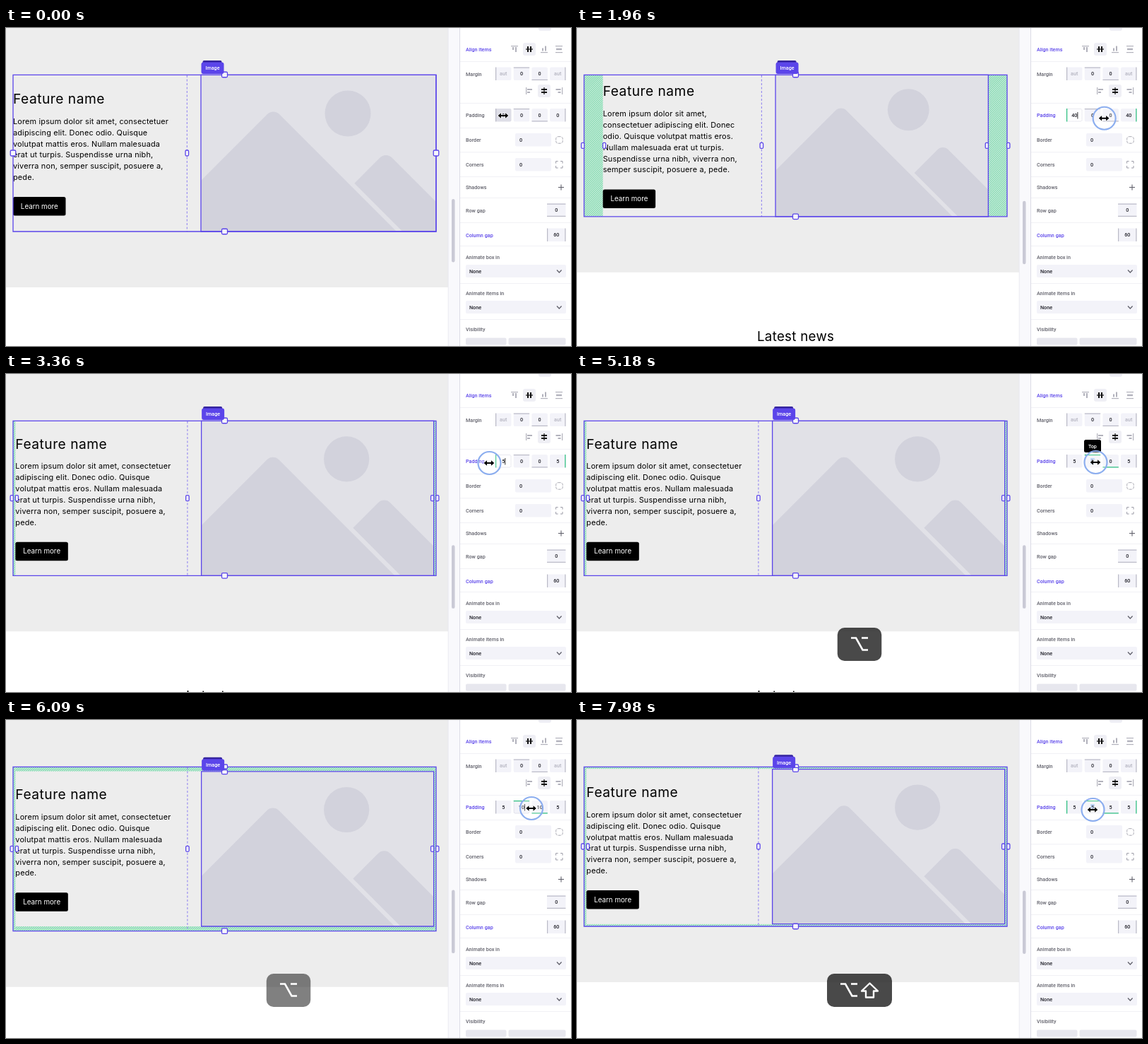
Write an HTML page with a canvas that moves like this. It is 800 px wide and 450 px high and loops after 8000 ms.

```html
<!DOCTYPE html>
<html lang="en">
<head>
<meta charset="utf-8">
<title>Padding controls</title>
<style>
html, body { margin: 0; width: 100%; height: 100%; overflow: hidden; background: #fff; }
canvas { display: block; }
</style>
</head>
<body>
<canvas id="stage" width="800" height="450"></canvas>
<script>
const c = document.getElementById('stage').getContext('2d');
const LOOP = 8000, PURPLE = '#5b45ea', GREEN = '#25bd7b', INK = '#62626c', LINE = '#b9b9c6', FIELD = '#f3f3f9';
const UNIT = 2 / 3; // stage pixels per padding unit

// Linear keyframes: [time, value, value...]
const cursorKeys = [[0, 704, 124], [630, 704, 124], [980, 716, 124], [1330, 716, 124], [1540, 726, 125],
  [2000, 748, 128], [2520, 732, 129], [3080, 694, 126], [3220, 694, 126], [3360, 684, 126], [3500, 680, 126],
  [3640, 680, 126], [4200, 708, 124], [4690, 708, 124], [5100, 734, 125], [5460, 734, 125], [6090, 743.5, 125],
  [6500, 756, 126], [7140, 737, 127], [7560, 730, 127]];
const sideKeys = [[630, 0], [980, 10], [1330, 10], [1540, 15], [2000, 40], [2520, 30], [3080, 10], [3220, 10], [3360, 5]];
const topKeys = [[5460, 0], [6090, 10], [6500, 20], [7140, 5]];

const copy = [
  'Lorem ipsum dolor sit amet, consectetuer|adipiscing elit. Donec odio. Quisque|volutpat mattis eros. Nullam malesuada|erat ut turpis. Suspendisse urna nibh,|viverra non, semper suscipit, posuere a,|pede.',
  'Lorem ipsum dolor sit amet,|consectetuer adipiscing elit. Donec odio.|Quisque volutpat mattis eros. Nullam|malesuada erat ut turpis. Suspendisse|urna nibh, viverra non, semper suscipit,|posuere a, pede.',
  'Lorem ipsum dolor sit amet,|consectetuer adipiscing elit. Donec|odio. Quisque volutpat mattis eros.|Nullam malesuada erat ut turpis.|Suspendisse urna nibh, viverra non,|semper suscipit, posuere a, pede.'
].map(s => s.split('|'));

const clamp = v => Math.max(0, Math.min(1, v));
const snap = v => Math.round(v / 5) * 5;

function at(keys, t) {
  const i = keys.findIndex(k => k[0] > t);
  if (i === 0) return keys[0].slice(1);
  if (i < 0) return keys[keys.length - 1].slice(1);
  const a = keys[i - 1], b = keys[i], p = (t - a[0]) / (b[0] - a[0]);
  return a.slice(1).map((v, j) => v + (b[j + 1] - v) * p);
}

// Opacity of something visible between two times
const shown = (t, from, to, fadeIn, fadeOut) => clamp((t - from) / fadeIn) * clamp(1 - (t - to) / fadeOut);

function box(x, y, w, h, fill, r = 0, stroke, lw = 1) {
  c.beginPath();
  c.roundRect(x, y, w, h, r);
  if (fill) { c.fillStyle = fill; c.fill(); }
  if (stroke) { c.strokeStyle = stroke; c.lineWidth = lw; c.stroke(); }
}

function path(points, color, lw, close) {
  c.beginPath();
  points.forEach(([x, y]) => c.lineTo(x, y));
  if (close) c.closePath();
  c.strokeStyle = color;
  c.lineWidth = lw;
  c.stroke();
}

function text(s, x, y, font, color, align = 'left', spacing = 0) {
  c.font = font;
  c.letterSpacing = spacing + 'px';
  c.fillStyle = color;
  c.textAlign = align;
  c.fillText(s, x, y);
}

const inter = (s, x, y, size, spacing = 0, color = '#000', align) =>
  text(s, x, y, `${size}px Inter, sans-serif`, color, align, spacing);
const ui = (s, x, y, color = INK, align) =>
  text(s, x, y + 2.6, '500 7.2px Roboto, sans-serif', color, align);

function hatch(x, y, w, h) {
  if (w <= 0 || h <= 0) return;
  c.save();
  c.beginPath();
  c.rect(x, y, w, h);
  c.clip();
  c.fillStyle = '#d6f0e3';
  c.fillRect(x, y, w, h);
  c.beginPath();
  for (let d = 0; d < w + h; d += 3) {
    c.moveTo(x + d, y);
    c.lineTo(x + d - h, y + h);
  }
  c.strokeStyle = '#7ad6ab';
  c.lineWidth = 1.1;
  c.stroke();
  c.restore();
}

function handle(x, y, w, h) {
  box(x - w / 2, y - h / 2, w, h, '#f6f6fa', 1.5, PURPLE, 1.3);
}

function placeholder(x, y, w, h) {
  c.save();
  c.beginPath();
  c.rect(x, y, w, h);
  c.clip();
  c.fillStyle = '#e1e1e7';
  c.fillRect(x, y, w, h);
  c.translate(x, y);
  c.scale(w / 333, w / 333);
  c.fillStyle = '#d2d2dc';
  c.beginPath();
  c.arc(208, 55, 32.5, 0, 7);
  c.fill();
  c.beginPath();
  c.moveTo(0, 150);
  c.arcTo(102.5, 47.5, 277, 222, 12);
  c.lineTo(277, 222);
  c.lineTo(0, 222);
  c.fill();
  c.beginPath();
  c.moveTo(217.3, 153.7);
  c.arcTo(262, 109, 333, 180, 12);
  c.lineTo(333, 180);
  c.lineTo(333, 222);
  c.lineTo(285.5, 222);
  c.fill();
  c.restore();
}

function page(side, top) {
  const q = side * UNIT, v = top * UNIT;
  const w = 333 - 1.19 * q, h = w * UNIT, x = 609 - q - w, y = 66 + v;
  const bottom = y + h + v, mid = y + h / 2, left = 10 + q;

  box(0, 0, 626, bottom + 79, '#ededed');
  inter('Latest news', 255, bottom + 176.5, 18.7, 0.3);

  hatch(10, 66, q, bottom - 66);
  hatch(609 - q, 66, q, bottom - 66);
  hatch(left, 66, 599 - 2 * q, v);
  hatch(left, bottom - v, 599 - 2 * q, v);

  placeholder(x, y, w, h);
  inter('Feature name', left, mid - 70, 19.2, 0.5);
  copy[side < 10 ? 0 : side < 22 ? 1 : 2].forEach((s, i) =>
    inter(s, left, mid - 41.2 + i * 15.85, 10.9, 0.16));
  box(left, mid + 62, 74.5, 26.5, '#000', 2.5);
  inter('Learn more', left + 37.3, mid + 78.5, 9.8, 0, '#fff', 'center');

  c.setLineDash([3, 2.5]);
  path([[x - 19.7, 67], [x - 19.7, bottom]], '#8b7df0', 1);
  c.setLineDash([]);
  box(10, 66.3, 599, bottom - 66.3, null, 0, PURPLE, 1.3);
  box(x, y + 0.3, w, h - 0.3, null, 0, PURPLE, 1.3);

  handle(x - 19.7, mid, 4.5, 8);
  if (side) [8.2, left + 2, 607 - q, 610.8].forEach(hx => handle(hx, mid, 4.2, 8));
  else [10, 609].forEach(hx => handle(hx, mid, 7.5, 8));
  handle(309.5, 66, 8, top ? 6 : 7.5);
  if (top) handle(309.5, y + 1, 8, 6);
  handle(309.5, bottom, 8, 7.5);

  box(x + 2.5, y - 20, 27, 6, '#35249f', 2);
  box(x + 0.5, y - 17.5, 32, 16.5, PURPLE, 3);
  ui('Image', x + 16.5, y - 9.3, '#fff', 'center');

  box(626, 0, 16.5, 450, '#f9f9fc');
  box(625.7, 0, 0.8, 450, '#e6e6ee');
  box(631, 242 + (288 - bottom) * 0.13, 4.5, 89.5, '#cacad6', 2.2);
}

// A value field; edges is any of "lrtb"
function field(x, y, w, value, edges, edge = LINE, color = '#22222a', fill = FIELD) {
  box(x, y, w, 18.5, fill, 2);
  const sides = { l: [x, y, 1.2, 18.5], r: [x + w - 1.2, y, 1.2, 18.5], t: [x, y, w, 1.2], b: [x, y + 17.3, w, 1.2] };
  for (const e of edges) box(...sides[e], edge);
  ui(value, x + w / 2, y + 9.3, color, 'center');
}

const fieldX = [693, 718.7, 744.4, 770], fieldEdges = 'ltbr';

function alignIcon(x, y, kind, vertical) {
  const active = kind === 1, color = active ? '#111' : '#b2b2bc';
  c.save();
  c.translate(x, y);
  if (active) box(-9, -9, 18, 18, '#efeff5', 3);
  if (vertical) c.rotate(Math.PI / 2);
  if (kind === 3) {
    box(-5, -5, 1.2, 10, color);
    box(4, -5, 1.2, 10, color);
    box(-1.2, -4, 2.4, 8, color);
  } else {
    box([-5, -0.6, 4][kind], -5, 1.2, 10, color);
    box([-3, -4, -4.5][kind], -3, active ? 8 : 7, 2, color);
    box([-3, -4, -1.5][kind], 1, active ? 8 : 4, 2, color);
  }
  c.restore();
}

function select(y) {
  box(651, y, 142, 18, FIELD, 2);
  ui('None', 656, y + 9, '#22222a');
  path([[780, y + 7.5], [783.3, y + 11], [786.6, y + 7.5]], INK, 1.3);
}

function panel(t, side, top) {
  box(642, 0, 158, 450, '#fff');
  box(642, 0, 1, 450, '#dcdce6');
  [47, 106, 141, 175.5, 210, 240, 275, 308, 361, 412].forEach(y => box(643, y, 157, 0.8, '#ececf2'));
  box(754, -6, 18, 10, '#efeff5', 3);

  const labels = [['Align items', 30], ['Margin', 65], ['Padding', 123.5], ['Border', 158.5], ['Corners', 193],
    ['Shadows', 225.5], ['Row gap', 258], ['Column gap', 293], ['Animate box in', 324],
    ['Animate items in', 375], ['Visibility', 426]];
  for (const [s, y] of labels) {
    const lit = s === 'Align items' || s === 'Column gap' || s === 'Padding' && t >= 630;
    ui(s, 651, y, lit ? PURPLE : INK);
  }

  [720, 741, 762, 783].forEach((x, i) => alignIcon(x, 30, i, true));
  [741, 762, 783].forEach((x, i) => alignIcon(x, 89, i));
  ['aut', '0', '0', 'aut'].forEach((s, i) =>
    field(fieldX[i], 55.5, 22.5, s, fieldEdges[i], LINE, s === '0' ? '#22222a' : '#b4b4c0'));

  padding(t, side, top);

  box(721, 149, 51, 18.5, FIELD, 2);
  box(721, 184, 51, 18.5, FIELD, 2);
  ui('0', 727, 158.5, '#22222a');
  ui('0', 727, 193, '#22222a');
  c.setLineDash([4, 1.2]);
  box(778.7, 153.7, 9.5, 9.5, null, 3, '#a0a0aa', 0.9);
  c.setLineDash([]);
  for (const sx of [-1, 1]) for (const sy of [-1, 1]) {
    path([[783.3 + 1.7 * sx, 193.3 + 4.7 * sy], [783.3 + 4.7 * sx, 193.3 + 4.7 * sy], [783.3 + 4.7 * sx, 193.3 + 1.7 * sy]], '#9a9aa6', 1);
  }
  path([[782, 225.5], [790, 225.5]], INK, 1.1);
  path([[786, 221.5], [786, 229.5]], INK, 1.1);
  field(766, 248.5, 26.5, '0', 'tb');
  field(766, 283.5, 26.5, '60', 'lr');
  select(335);
  select(386);
  box(651, 438.5, 57.5, 10, '#e7e7ee', 2);
  box(711.5, 438.5, 81, 10, '#e7e7ee', 2);
}

function padding(t, side, top) {
  const onTop = t >= 5000, focus = onTop ? 1 : 0;
  const selected = onTop ? t < 5460 || t >= 7770 : t < 630;
  const green = t < 350 ? '' : t < 4800 ? 'lr' : t < 7770 ? 'tb' : 'lrtb';
  [side, top, top, side].forEach((value, i) => {
    const active = i === focus && t >= 630, e = fieldEdges[i];
    const fill = t < 630 && i === 0 ? '#dedee7' : active && !onTop ? '#fff' : FIELD;
    const x = fieldX[i];
    box(x, 114, 22.5, 18.5, fill, 2);
    if (active && !selected) {
      c.setLineDash([1, 1]);
      box(x + 0.5, 114.5, 21.5, 17.5, null, 2, '#c8c8d8', 0.8);
      c.setLineDash([]);
    }
    if (active && selected) box(x + 8.5, 119, 5.5, 9, '#a9c8f7');
    field(x, 114, 22.5, String(value), e, green.includes(e) ? GREEN : LINE, '#22222a', 'transparent');
    if (active && !selected) box(x + 11.3 + String(value).length * 2.1, 119, 0.8, 9.5, '#000');
  });
}

function cursor(t) {
  const [x, y] = at(cursorKeys, t);
  c.save();
  c.translate(x, y);
  c.globalAlpha = Math.max(shown(t, 560, 3640, 70, 140), shown(t, 5040, 7350, 70, 140), shown(t, 7770, 8100, 70, 140));
  c.beginPath();
  c.arc(0.5, 0, 16, 0, 7);
  c.fillStyle = 'rgba(255,255,255,.2)';
  c.fill();
  c.strokeStyle = '#8caeef';
  c.lineWidth = 2.2;
  c.stroke();
  c.globalAlpha = 1;
  const arrow = [[-7.3, 0], [-3, -3.7], [-3, -0.9], [3, -0.9], [3, -3.7], [7.3, 0], [3, 3.7], [3, 0.9], [-3, 0.9], [-3, 3.7]];
  path(arrow, '#fff', 1.2, true);
  c.fillStyle = '#000';
  c.fill();
  c.restore();
}

function tooltip(t) {
  c.globalAlpha = shown(t, 4900, 5460, 100, 100);
  box(718, 93, 24, 18, '#000', 2.5);
  ui('Top', 730, 102, '#fff', 'center');
  c.globalAlpha = 1;
}

function keys(t) {
  const opacity = Math.max(shown(t, 280, 1550, 140, 300), shown(t, 4760, 6000, 140, 300), shown(t, 7700, 9000, 140, 300));
  if (!opacity) return;
  const both = t >= 7770, w = both ? 92 : 62.5, x = both ? 385 : 400;
  c.globalAlpha = opacity;
  box(400 - w / 2, 359, w, 47, 'rgba(44,44,44,.86)', 10);
  c.globalAlpha = 1; // white signs stay white while the plate fades over white
  path([[x - 12, 373.5], [x - 5, 373.5], [x + 4.5, 390.5], [x + 12, 390.5]], '#fff', 2.6);
  path([[x + 3, 373.5], [x + 12, 373.5]], '#fff', 2.6);
  if (both) {
    c.lineJoin = 'round';
    path([[414.5, 372.5], [426, 383.5], [420, 383.5], [420, 392.5], [409, 392.5], [409, 383.5], [403, 383.5]], '#fff', 2.4, true);
    c.lineJoin = 'miter';
  }
}

function draw() {
  const t = performance.now() % LOOP;
  const side = snap(at(sideKeys, t)[0]), top = snap(at(topKeys, t)[0]);
  c.fillStyle = '#fff';
  c.fillRect(0, 0, 800, 450);
  page(side, top);
  panel(t, side, top);
  tooltip(t);
  cursor(t);
  keys(t);
  requestAnimationFrame(draw);
}
draw();
</script>
</body>
</html>
```
